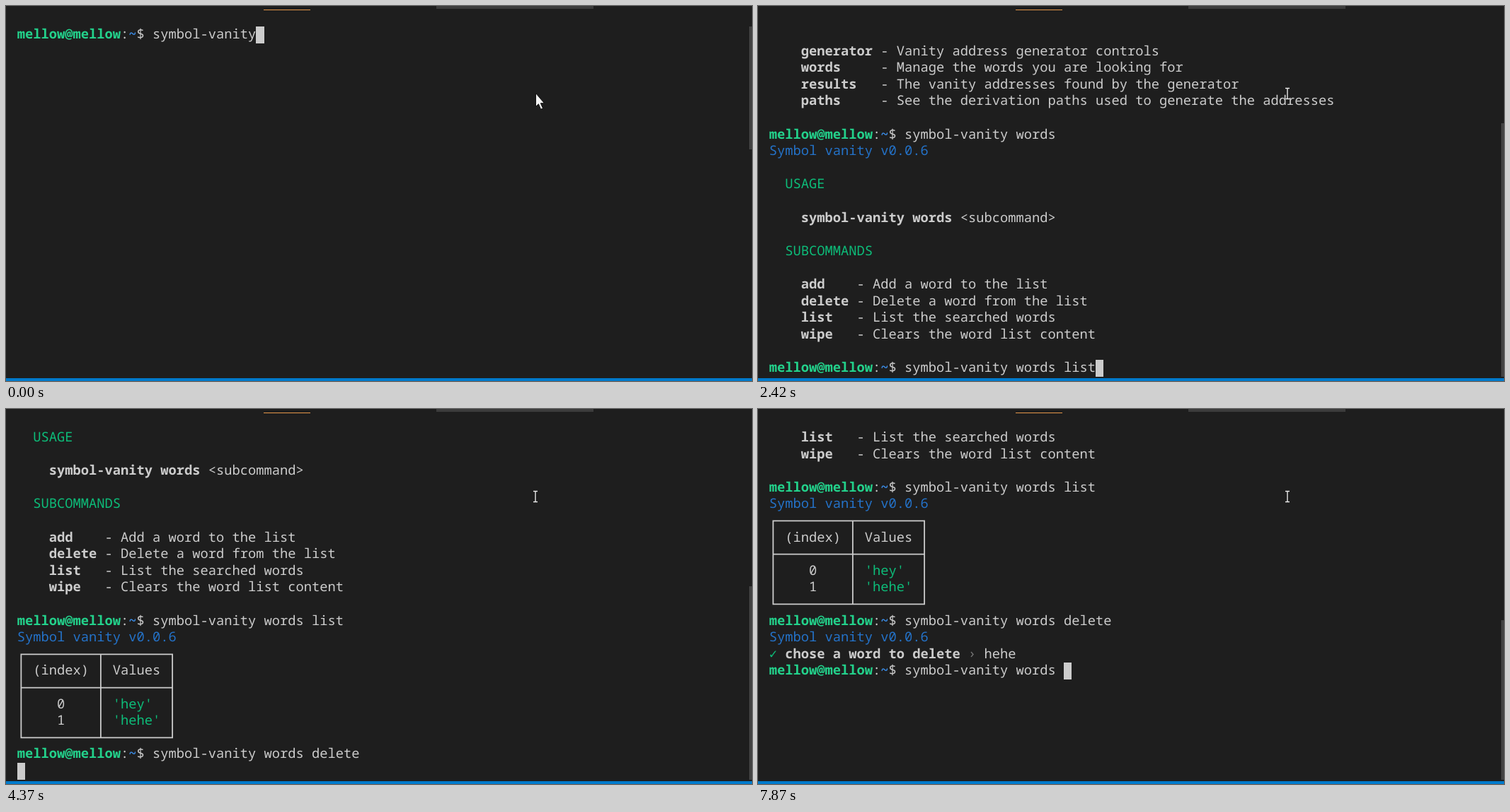
Write an HTML page that moves like this. It is 1054 px wide and 531 px high and loops after 8000 ms.

```html
<!DOCTYPE html>
<html lang="en">
<head>
<meta charset="utf-8">
<title>Terminal session</title>
<style>
html, body { margin: 0; width: 100%; height: 100%; overflow: hidden; background: #1e1e1e; }
#stage { position: relative; width: 1054px; height: 531px; overflow: hidden; background: #1e1e1e; }
#stage div, #stage svg { position: absolute; }
#screen { left: 0; top: 0; width: 1054px; height: 531px; color: #ccc;
  font: 18.75px/23.6px "Noto Sans Mono", "DejaVu Sans Mono", monospace;
  font-variant-ligatures: none; text-rendering: geometricPrecision; }
#screen span { position: absolute; white-space: pre; }
.b { font-weight: 700; }
.user { color: #23d18b; font-weight: 700; }
.path { color: #3b8eea; font-weight: 700; }
.blue { color: #2472c8; }
.green { color: #0dbc79; }
.cyan { color: #11a8cd; }
.dim { color: #767676; }
.pick { color: #11a8cd; text-decoration: underline 1.5px; text-underline-offset: 2px; }
#screen .ring, #screen .on { box-sizing: border-box; width: 10px; height: 10px; border: 2px solid #ccc;
  border-radius: 50%; margin: 8px 0 0 .4px; font-size: 0; }
#screen .on { border-color: #0dbc79; background: radial-gradient(#0dbc79 0 2px, transparent 2.6px); }
#caret { width: 11.25px; height: 23.6px; background: #ccc; }
#thumb { left: 1050px; width: 4px; background: #424242; }
#tab { left: 364px; top: 5px; width: 66px; height: 1px; background: #e5974a; }
#input { left: 608px; top: 0; width: 222px; height: 4px; background: #3c3c3c; }
#status { left: 0; top: 527px; width: 1054px; height: 4px; background: #007acc; }
#grid path { fill: none; stroke: #ccc; stroke-width: 1.8; }
</style>
</head>
<body>
<div id="stage">
  <div id="tab"></div>
  <div id="input"></div>
  <div id="caret"></div>
  <svg id="grid" width="260" height="150"><path/></svg>
  <div id="screen"></div>
  <div id="thumb"></div>
  <div id="status"></div>
  <svg id="mouse" width="1054" height="531">
    <path id="arrow" d="M748.5 123.5V142.5L752.4 138.8L755.6 146.3L758.6 145L755.4 137.7H760.6Z" fill="#f4f4f4" stroke="#111" stroke-width="1"/>
    <g id="beam" fill="none">
      <path d="M745 116.5H751M748 116.5V131.5M745 131.5H751" stroke="#111" stroke-width="3"/>
      <path d="M745 116.5H751M748 116.5V131.5M745 131.5H751" stroke="#eee" stroke-width="1.4"/>
    </g>
  </svg>
</div>
<script>
{
const LOOP = 8000, X0 = 15.75, Y0 = 29, CELL = 11.25, ROW = 23.6, ROWS = 21, GRID_ROW = 30;
const $ = id => document.getElementById(id);
const cmd = "symbol-vanity", words = cmd + " words";

// A line is a list of [class, text] runs.
const blank = [];
const plain = text => [["", text]];
const title = [["blue", "Symbol vanity v0.0.6"]];
const prompt = text => [["user", "mellow@mellow"], ["", ":"], ["path", "~"], ["", "$ " + text]];
const head = text => [["green", "  " + text]];

const help = (name, items) => {
  const wide = Math.max(...items.map(([key]) => key.length));
  return [title, blank, head("USAGE"), blank,
    [["b", "    " + name], ["", " <subcommand>"]], blank,
    head("SUBCOMMANDS"), blank,
    ...items.map(([key, info]) => [["b", "    " + key.padEnd(wide)], ["", " - " + info]]),
    blank];
};

const value = (i, text) => [["", "     " + i + "      "], ["green", `'${text}'`]];
const question = (cls, mark) => [[cls, mark], ["b", " chose a word to delete "], ["dim", "›"]];

const log = [
  prompt(cmd),
  ...help(cmd, [
    ["generator", "Vanity address generator controls"],
    ["words", "Manage the words you are looking for"],
    ["results", "The vanity addresses found by the generator"],
    ["paths", "See the derivation paths used to generate the addresses"]]),
  prompt(words),
  ...help(words, [
    ["add", "Add a word to the list"],
    ["delete", "Delete a word from the list"],
    ["list", "List the searched words"],
    ["wipe", "Clears the word list content"]]),
  prompt(words + " list"),
  title, blank, plain("  (index)   Values"), blank, value(0, "hey"), value(1, "hehe"), blank,
  prompt(words + " delete"),
  title,
  [...question("green", "✓"), ["", " hehe"]]
];

const option = (text, picked, on) => [[on ? "on" : "ring", "o"], ["", "   "], [picked ? "pick" : "", text]];
const menu = (pick, on) => [
  question("cyan", "?"),
  plain("Instructions:"),
  plain("    ↑/↓: Highlight option"),
  plain("    ←/→/[space]: Toggle selection"),
  plain("    a: Toggle all"),
  plain("    enter/return: Complete answer"),
  option("hey", pick === 0, false),
  option("hehe", pick === 1, on)
];

const ask = text => [prompt(text)], wait = [blank];

// [start in ms, finished log lines, live lines below them, least scroll]
const steps = [
  [0, 0, ask(cmd)],
  [330, 1, wait],
  [390, 14, ask("")],
  [1090, 14, ask(cmd)],
  [1170, 14, ask(words)],
  [1470, 16, wait],
  [1560, 28, ask("")],
  [1880, 28, ask(words)],
  [2120, 28, ask(words + " l")],
  [2280, 28, ask(words + " lis")],
  [2420, 28, ask(words + " list")],
  [2500, 29, wait],
  [2590, 36, ask("")],
  [3060, 36, ask(words + " list")],
  [3370, 36, ask(words + " de")],
  [3520, 36, ask(words + " del")],
  [3590, 36, ask(words + " dele")],
  [3760, 36, ask(words + " delete")],
  [4370, 37, wait],
  [4450, 38, menu(0, false)],
  [5460, 38, menu(1, false)],
  [5930, 38, menu(1, true)],
  [6470, 39, ask(""), 25],
  [7320, 39, ask(words + " list"), 25],
  [7870, 39, ask(words + " "), 25]
];

const colX = col => X0 + col * CELL;

const place = (el, x, y) => {
  el.style.left = x + "px";
  el.style.top = y + "px";
};

// Each word starts on its own cell.
const drawLine = (line, y, out) => {
  let col = 0;
  for (const [cls, text] of line) {
    for (const word of text.matchAll(/\S+/g)) {
      const span = document.createElement("span");
      span.className = cls;
      span.textContent = word[0];
      place(span, colX(col + word.index), y);
      out.push(span);
    }
    col += text.length;
  }
  return col;
};

const show = ([start, done, live, least = 0]) => {
  const lines = [...log.slice(0, done), ...live];
  const scroll = Math.max(least, lines.length - ROWS);
  const rowY = i => Y0 + (i - scroll) * ROW;
  const out = [];
  let end = 0;
  for (let i = scroll; i < lines.length; i++) end = drawLine(lines[i], rowY(i) - 1, out);
  $("screen").replaceChildren(...out);
  place($("caret"), colX(end), rowY(lines.length - 1));

  $("grid").style.display = done > GRID_ROW ? "" : "none";
  place($("grid"), 0, rowY(GRID_ROW));

  const thumbY = scroll ? Y0 + 496 * scroll / (scroll + ROWS) : Y0;
  $("thumb").style.top = thumbY + "px";
  $("thumb").style.height = (scroll ? 525 - thumbY : 174) + "px";

  $("arrow").style.display = start ? "none" : "";
  $("beam").style.display = start ? "" : "none";
};

const [x1, x2, x3] = [0, 10, 19].map(col => colX(col + .5));
const [y1, y2, y3] = [0, 2, 5].map(row => row * ROW + 11.4);
$("grid").firstChild.setAttribute("d", `M${x1} ${y1}H${x3}V${y3}H${x1}ZM${x1} ${y2}H${x3}M${x2} ${y1}V${y3}`);

let current;
const tick = () => {
  const t = performance.now() % LOOP;
  const step = steps.findLast(s => s[0] <= t);
  if (step !== current) show(current = step);
  requestAnimationFrame(tick);
};
tick();
}
</script>
</body>
</html>
```
